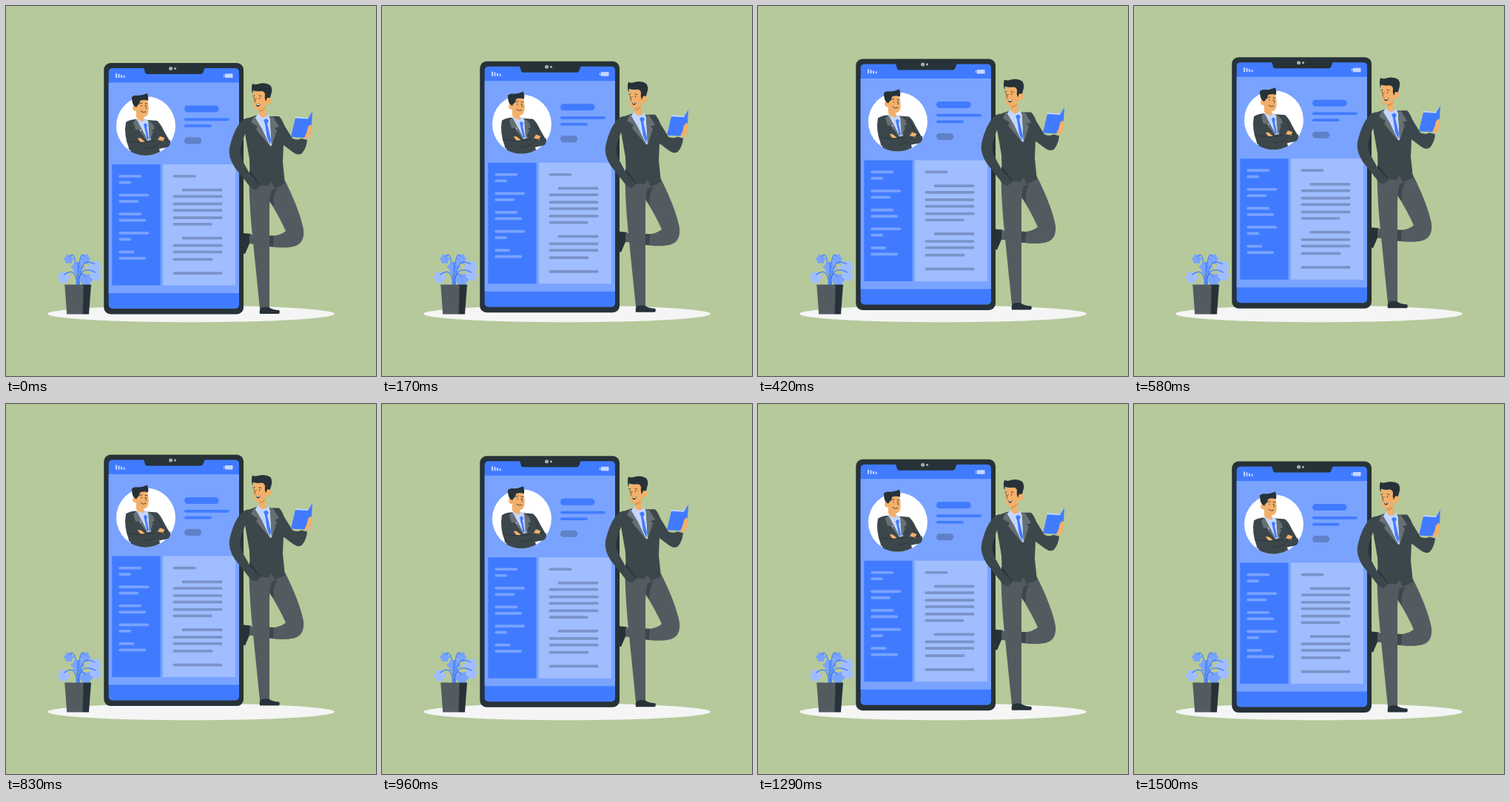
Write an HTML page that moves like this. It is 500 px wide and 500 px high and loops after 1.54 s.

```html
<!DOCTYPE html>
<html lang="en">
<head>
<meta charset="utf-8">
<title>Floating profile</title>
<style>
  html, body { margin: 0; height: 100%; overflow: hidden; background: #b5c99a; }
  svg { display: block; width: 100vw; height: 100vh; }
  .ink { fill: #263238; }
  .suit { fill: #3c474c; }
  .trouser { fill: #535b60; }
  .lapel { fill: #677074; }
  .skin { fill: #f3b06a; }
  .shade { fill: #d9944f; }
  .blue { fill: #407bff; }
  .mid { fill: #79a3ff; }
  .pale { fill: #a0bdff; }
  .shirt { fill: #c6d7ff; }
  .white { fill: #fff; }
  .line { fill: none; stroke: #263238; stroke-width: .8; stroke-linecap: round; }
  .stem { fill: none; stroke: #407bff; stroke-width: 1.1; }
</style>
</head>
<body>
<svg viewBox="0 0 500 500">
  <ellipse cx="250" cy="416" rx="194" ry="11.3" fill="#f5f5f5"/>

  <g id="leaves"></g>
  <path class="trouser" d="M79.3 376.5H105L104 416.6H82.2Z"/>
  <path class="ink" d="M104.6 376.5H115L112 416.6H103.6Z"/>

  <g id="floating">
    <rect class="ink" x="132.3" y="77" width="188.7" height="339.5" rx="9"/>
    <rect class="blue" x="138.7" y="84" width="176.3" height="325" rx="5"/>
    <path class="mid" d="M138.7 103.5H315V388H138.7Z"/>
    <path class="ink" d="M184 82Q187 84 187.500 88Q188 92 191 92H263Q266 92 267 88Q268 84 270 82Z"/>
    <g fill="#a8adaf"><circle cx="222.6" cy="84.5" r="2.5"/><circle cx="228.5" cy="84.5" r="1.6"/></g>
    <path class="shirt" d="M296 91.5H306.500V97H296ZM294 92.700H295.300V95.800H294Z"/>

    <path class="blue" d="M143.300 214H208.600V377.500H143.300Z"/>
    <path class="pale" d="M212 214H310V377.500H212Z"/>
    <g id="bars"></g>

    <g id="avatar">
      <circle class="white" cx="189" cy="162" r="40"/>
      <path class="suit" d="M162 157Q168 153 177 153L204 155Q209 159 213 168L222 184Q222 190 217 191L207 193L208 197A40 40 0 0 1 169 197Q161 184 161 166Z"/>
      <path class="shirt" d="M173 157L179 151L190 153L194 158L196 181L191 182Z"/>
      <path class="lapel" d="M172 157L177 154L192 182L181 170L183 167L175 167ZM192 154L199 160L201 166L197 168L199 170L194 182Z"/>
      <path class="blue" d="M186 160L189 158L191 161L190 164L193 179L191 181L187 164Z"/>
      <path class="skin" d="M176 139V150Q178 155 187 156L186 149Z"/>
      <path class="skin" d="M175 128Q183 125 191 128Q194 138 192 145Q190 151 184 150Q178 148 176 142Q171 142 171 137Q172 133 176 135Z"/>
      <path class="ink" d="M170 123Q173 120 178 121Q184 121 191 118Q193 123 192 128Q186 126 181 128Q181 132 178 134L176 137L173 135Q170 131 170 123Z"/>
      <path class="line" d="M181 132L184 131M188 132L191 132M188 135Q191 138 189 139M182 142Q185 145 189 143M183 134.500V135.500M189 134.500V135.500"/>
      <path class="skin" d="M178 179Q181 177 185 181L188 184L182 185ZM205 181L208 176L214 178L213 183L208 183Z"/>
      <path class="suit" d="M165 181Q173 180 183 184L200 183L207 181L213 184L222 181Q223 188 216 191L185 194L166 194Z"/>
      <path class="line" d="M167 183L183 185L201 183M190 193Q203 192 208 183L219 180M206 163L211 174"/>
    </g>

    <g id="reader">
      <path class="ink" d="M331 308L321 307L319 310L320.500 334L323 335Q326 328 329 321L333 321Z"/>
      <path class="trouser" d="M355 236H377Q397 276 402 302Q404 321 389 325Q374 328 357 325L329 321V309L357 311Q372 310 378 304Q370 286 357 265Z"/>
      <path class="suit" d="M355 310L362 310.500L361 325.500L355 325ZM356 250L367 246Q360 255 362 271L356 264Z"/>
      <path class="trouser" d="M328.500 238H361Q356 258 356 275V408L343 409L334 320Q329 275 328.500 238Z"/>
      <path class="ink" d="M343 416Q342 411 344 408Q350 406 355 407Q361 411 369 411Q371 414 368.500 416Z"/>

      <path class="suit" d="M323 153L337 148L357 149L369 149Q373 153 376 161L387 179Q394 182 399 179L407 181Q406 192 400 199Q395 203 387 197L375 188L374 211L377 240L363 246L359 237L355 243L330 241L329 207L323 172Z"/>
      <path class="ink" d="M329 222L344 242L337 245L329 240Z"/>
      <path class="suit" d="M327 151L321 153Q308 164 302 192Q300 204 309 218L328 242Q331 248 338 248L344 243L329 226L318 206Q315 196 318 187L324 170Z"/>
      <path class="shirt" d="M336 151L342 145L351 149L355 147L357 153L359 189L357 189Z"/>
      <path class="lapel" d="M335 149L331 157L340 163L338 167L357 190L346 166L337 151ZM357 149L361 150L369 163L363 165L366 168L359 190Z"/>
      <path class="blue" d="M348 154L352 152L355 155L353 159L358 181L357 187L353 178L350 159Z"/>

      <path class="skin" d="M341 137L342 147Q347 153 351 149L350 133Z"/>
      <path class="shade" d="M342 141Q347 140 350 136V139Q347 143 342 143Z"/>
      <path class="skin" d="M334 116Q343 113 350 115L353 123Q358 122 359 127Q358 133 352 133Q350 140 342 141Q336 141 335 135Q333 126 334 116Z"/>
      <path class="ink" d="M333 119Q331 110 333 105Q337 107 342 105Q351 103 357 107Q361 112 358 120L357 124L353 124L351 129Q349 124 350 119Q349 115 345 115Q338 116 334 114Z"/>
      <path class="line" d="M333.500 122L336 121M342 121L345 122M338 125Q334 129 337 130M335.500 124V125.500M342.500 124V125.500"/>
      <path class="ink" d="M337.500 132Q341 133.500 344 132Q343 136 340 136Q338 135 337.500 132Z"/>
      <path class="white" d="M338 132.300Q341 133.500 343.500 132.300L343 133.500Q340 134.500 338.500 133.500Z"/>

      <path class="shirt" d="M390 149.500L409 151L413 142L414 144L409 154L391 152Z"/>
      <path class="blue" d="M391 151.500L408 152.500L414 142L413 160L404 178L385 177Z"/>
      <path class="skin" d="M406 172L408 164L411 160Q415 164 413 172L408 180L403 178Z"/>
    </g>
  </g>
</svg>
<script>
  const LOOP = 1540, STEPS = 37, RISE = 10.4, REST = 0.56;
  const $ = id => document.getElementById(id);
  const floating = $('floating');

  function bar(x, y, width, color, height = 3.7, radius = height / 2) {
    $('bars').innerHTML +=
      `<rect x="${x}" y="${y - height / 2}" width="${width}" height="${height}" rx="${radius}" fill="${color}"/>`;
  }

  // Signal strength and profile heading
  for (let i = 0; i < 4; i++) bar(148.1 + 3.5 * i, 94 + i / 2, 2, '#c6d7ff', 6 - i, 0);
  bar(241, 139, 46.6, '#407bff', 9);
  bar(241, 153.3, 60.7, '#407bff');
  bar(241, 162, 36.7, '#407bff');
  bar(241, 182, 23.3, '#6081c8', 9);

  // Sidebar: pairs of entries
  [3, 1, 4, 2, 3, 3, 4, 1, 2, 3].forEach((units, i) => {
    const second = i % 2;
    bar(152.4, 230 + 12.8 * (i - second) + 8.5 * second, 10 * units + (second ? 6.7 : 0.8), '#79a3ff');
  });

  // Page: indented paragraphs on one grid of rows, each with a short last row
  function paragraph(first, count, lastWidth) {
    for (let i = 0; i < count; i++) {
      const row = first + i, indent = count > 1 && i === 0 ? 12 : 0;
      const width = i === count - 1 ? lastWidth : 67 - indent;
      bar(225.5 + indent, 230 + 9.36 * row - row % 2 * 0.65, width, '#7b93c9');
    }
  }
  paragraph(0, 1, 31);
  paragraph(2, 6, 53);
  paragraph(9, 4, 54);
  paragraph(14, 1, 67);

  // A lobed leaf hanging from an arched stem
  function leaf(x, y, size, tone) {
    const rim = Array.from({ length: 40 }, (_, i) => {
      const angle = i * Math.PI / 20, r = size * (1 + 0.14 * Math.cos(6 * angle));
      return [x + r * Math.cos(angle), y + r * Math.sin(angle)].map(v => v.toFixed(1));
    });
    const root = 97 + (x - 97) / 12;
    $('leaves').innerHTML += `<path class="${tone}" d="M${rim.join('L')}Z"/>` +
      `<path class="stem" d="M${root} 377Q${root} ${y - 16} ${x} ${y - size / 2}"/>`;
  }
  leaf(85, 342, 6, 'mid');
  leaf(78, 367, 7.5, 'pale');
  leaf(97, 353, 8, 'mid');
  leaf(107, 342, 6.5, 'mid');
  leaf(120, 353, 8.5, 'pale');
  leaf(121, 364, 7.5, 'pale');
  leaf(108, 370, 8, 'mid');

  // Linear rise and fall in even steps, opening one step above rest
  function draw(now) {
    const step = Math.floor((now + 10) % LOOP / LOOP * STEPS);
    const phase = (step + 1) / STEPS % 1;
    const lift = RISE * (1 - Math.abs(1 - 2 * phase));
    floating.setAttribute('transform', `translate(0 ${REST - lift})`);
    requestAnimationFrame(draw);
  }
  const start = performance.now();
  const loop = () => {
    draw(0);
  };
  requestAnimationFrame(now => draw(Math.max(0, now - start)));
</script>
</body>
</html>
```
